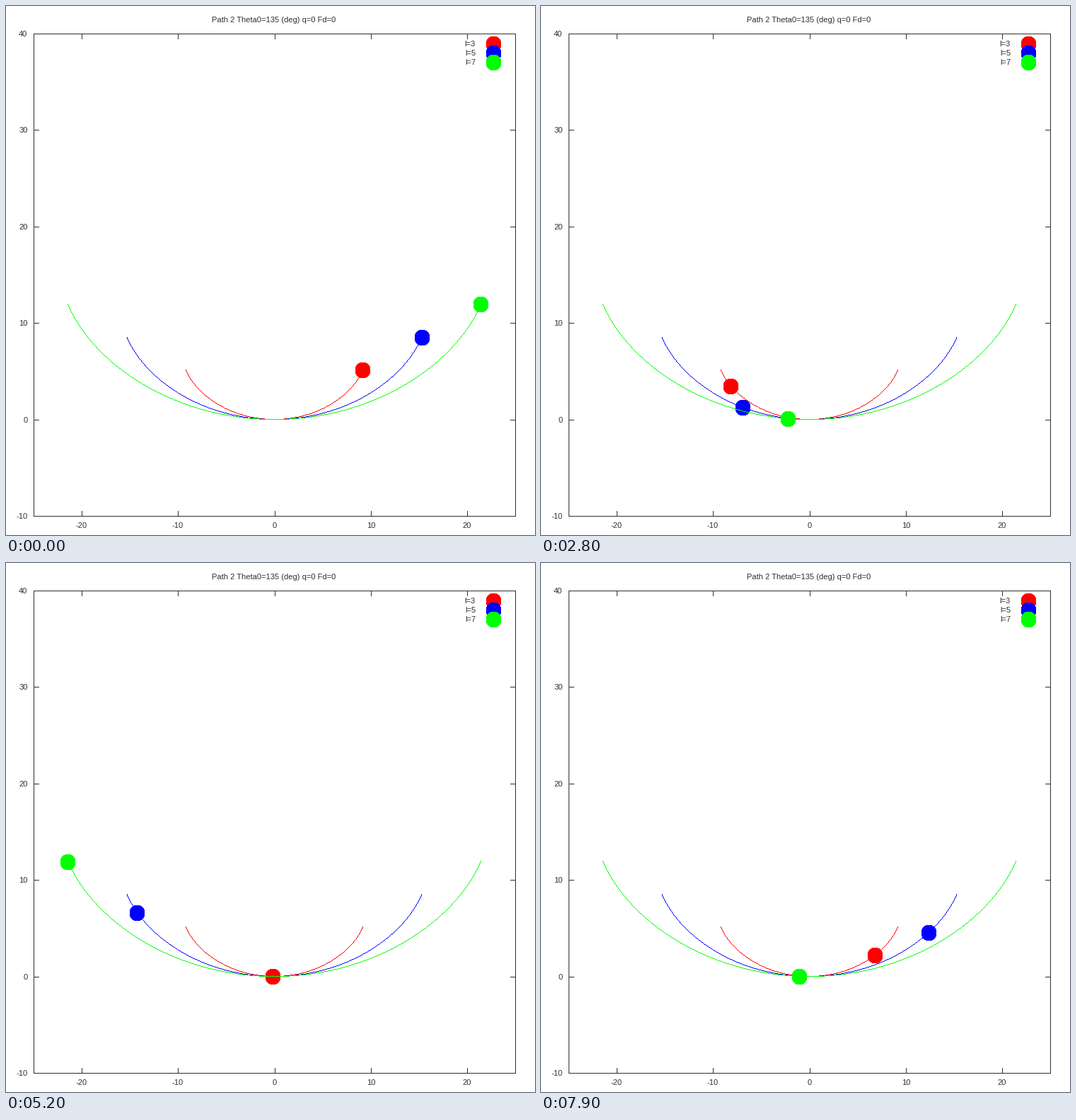
A matplotlib script for the animation above (8000 ms loop, 748 by 748 pixels).

```python
import numpy as np
import matplotlib.pyplot as plt
from matplotlib.animation import FuncAnimation
from matplotlib.collections import PolyCollection
from matplotlib.patches import Ellipse

SIZE, DPI = 748, 100
FRAMES, STEP = 80, 100          # frames, ms per frame
LEFT, TOP, RIGHT, BOTTOM = 39, 39, 720, 721
TICK = 8
INK = "#303030"
G = 9.8
THETA0 = np.radians(135)
PATHS = [(3, "#ff0000"), (5, "#0000ff"), (7, "#00ff00")]

plt.rcParams["font.family"] = "Liberation Sans"
fig = plt.figure(figsize=(SIZE / DPI, SIZE / DPI), dpi=DPI, facecolor="white")
ax = fig.add_axes([0, 0, 1, 1])
ax.set_xlim(0, SIZE)
ax.set_ylim(SIZE, 0)
ax.axis("off")


def to_px(x, y):
    return (LEFT + (x + 25) * (RIGHT - LEFT) / 50,
            TOP + (40 - y) * (BOTTOM - TOP) / 50)


def cycloid_px(length, theta):
    return to_px(length * (theta + np.sin(theta)),
                 length * (1 - np.cos(theta)))


def blocks(rects, color, z):
    """Crisp pixel-aligned rectangles given as (x, y, w, h)."""
    verts = [[(x, y), (x + w, y), (x + w, y + h), (x, y + h)]
             for x, y, w, h in rects]
    ax.add_collection(PolyCollection(verts, facecolors=color, linewidths=0,
                                     antialiaseds=False, zorder=z),
                      autolim=False)


def label(x, y, text, ha="center"):
    ax.text(x, y, text, ha=ha, va="baseline", size=8, color=INK, zorder=1)


def disc_center(x, y):
    return np.floor(x) + 0.5, np.floor(y) + 1


def disc(x, y, color, z):
    return ax.add_patch(Ellipse(disc_center(x, y), 21, 21.4, fc=color, lw=0,
                                antialiased=False, snap=False, zorder=z))


def curve(length, color, z):
    """One-pixel line: a pixel per column where flat, per row where steep."""
    cells = set()
    for side in (-1, 1):
        px, py = cycloid_px(length, side * np.linspace(0, THETA0, 2001))
        count = 2001 * 90 // 135
        cols = np.arange(*np.sort(np.floor(px[[0, count]]))) + 0.5
        flat = np.interp(side * cols, side * px, py)
        rows = np.arange(np.floor(py[-1]), np.floor(py[count]) + 1) + 0.5
        steep = np.interp(-rows, -py, px)
        cells |= set(zip(np.floor(cols), np.floor(flat)))
        cells |= set(zip(np.floor(steep), np.floor(rows)))
    blocks([(x, y, 1, 1) for x, y in sorted(cells)], color, z)


def pose(length, t):
    """Bead sliding on a cycloid: its arc length is exactly harmonic."""
    swing = np.cos(np.sqrt(G / (4 * length)) * t)
    return cycloid_px(length, 2 * np.arcsin(np.sin(THETA0 / 2) * swing))


# Frame, ticks and labels
wide, high = RIGHT - LEFT + 1, BOTTOM - TOP + 1
lines = [(LEFT, TOP, wide, 1), (LEFT, BOTTOM, wide, 1),
         (LEFT, TOP, 1, high), (RIGHT, TOP, 1, high)]
for v in range(-20, 21, 10):
    x = np.floor(to_px(v, 0)[0] + 0.5)
    lines += [(x, TOP, 1, TICK), (x, BOTTOM - TICK + 1, 1, TICK)]
    label(x, 738, str(v))
for v in range(-10, 41, 10):
    y = np.floor(to_px(0, v)[1] + 0.5)
    lines += [(LEFT, y, TICK, 1), (RIGHT - TICK + 1, y, TICK, 1)]
    label(30.5, y + 4, str(v), "right")
blocks(lines, INK, 1)
label(379, 23, "Path 2 Theta0=135 (deg) q=0 Fd=0")

# Curves, beads and key
beads = []
for i, (length, color) in enumerate(PATHS):
    z = 2 + 2 * i
    curve(length, color, z)
    beads.append(disc(*pose(length, 0), color, z + 1))
    label(664, 57 + 13 * i, f"l={length}", "right")
    disc(689, 53 + 13.3 * i, color, z + 1)


def draw(frame):
    t = frame * STEP / 1000
    for bead, (length, _) in zip(beads, PATHS):
        bead.center = disc_center(*pose(length, t))
    return beads


anim = FuncAnimation(fig, draw, frames=FRAMES, interval=STEP,
                     repeat=True, repeat_delay=0, blit=False)
plt.show()
```
